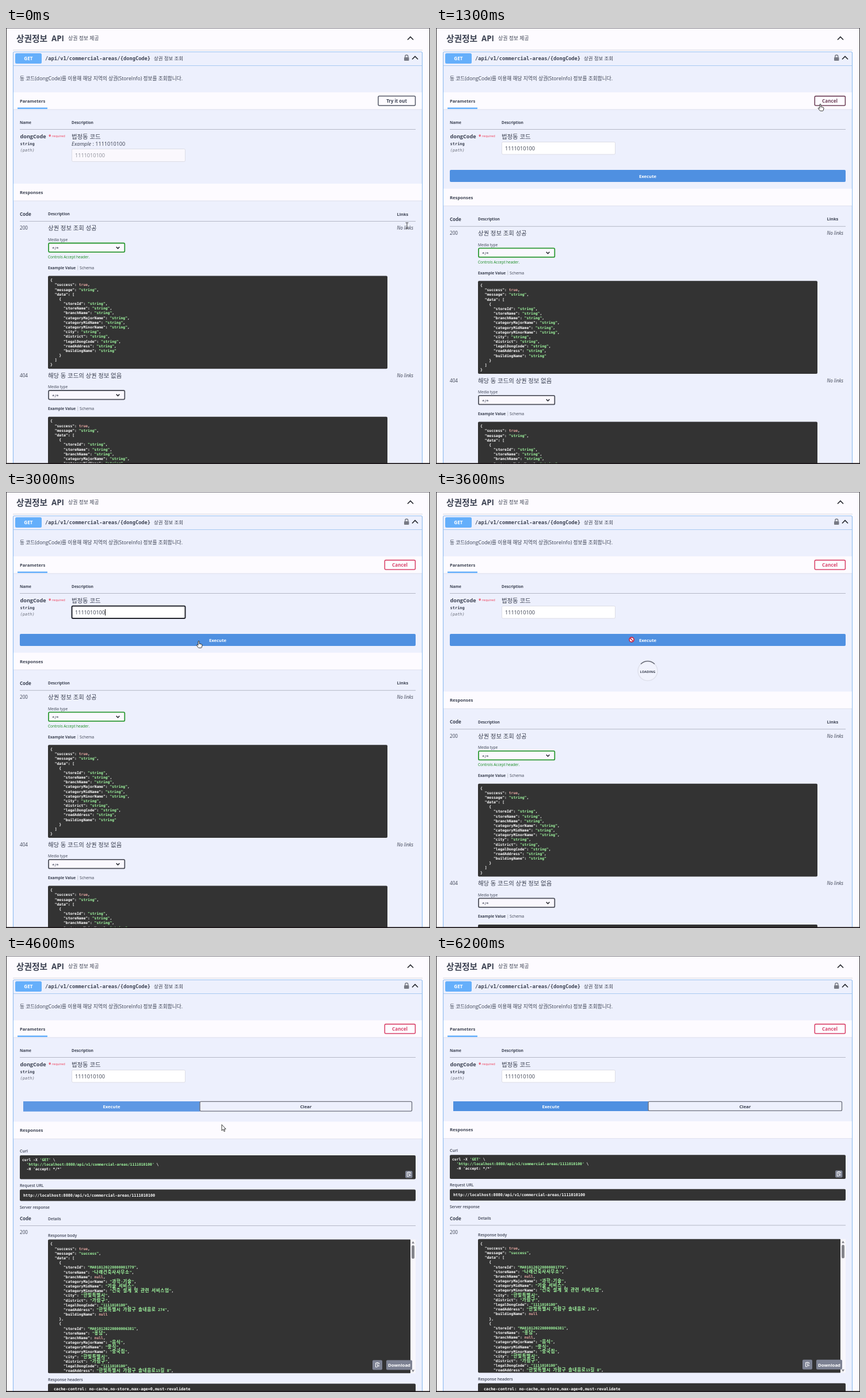
Recreate the animation shown at these times as an HTML page. Size 737 px wide and 759 px high, loop 6300 ms.

```html
<!DOCTYPE html>
<html lang="ko">
<head>
<meta charset="utf-8">
<title>API docs</title>
<style>
html, body { margin: 0; width: 737px; height: 759px; overflow: hidden; background: #fdfbff; }
svg { display: block; }
text { font-family: "Open Sans", "Noto Sans CJK KR", "Noto Sans CJK", sans-serif; fill: #3b4151; white-space: pre; }
.b { font-weight: 700; }
.m { font-weight: 600; }
.l { font-weight: 300; }
.i { font-style: italic; }
.mono { font-family: "DejaVu Sans Mono", "Noto Sans CJK KR", monospace; }
.code { fill: #fff; }
.code .str { fill: #a2fca2; }
.code .lit { fill: #e9a9a4; }
.code .ko { font-family: "Noto Sans CJK KR", "Noto Sans CJK", sans-serif; font-size: 7.65px; letter-spacing: .6px; }
</style>
</head>
<body>
<svg id="stage" width="737" height="759" viewBox="0 0 737 759"></svg>
<script>
const LOOP = 6300, STEP = 100;
const INK = '#3b4151', PAPER = '#fdfbff', PANEL = '#edf0fd', DARK = '#333', BLUE = '#4f90e1';

// Text is placed by its left edge and its vertical middle.
const text = (x, mid, str, size, cls = '', extra = '') =>
  `<text x="${x}" y="${(mid + size * .36).toFixed(2)}" font-size="${size}" class="${cls}" ${extra}>${str}</text>`;
const center = (x, mid, str, size, fill, cls = 'b') =>
  text(x, mid, str, size, cls, `text-anchor="middle" style="fill:${fill}"`);
const box = (x1, y1, x2, y2, fill, extra = '') =>
  `<rect x="${x1}" y="${y1}" width="${x2 - x1}" height="${y2 - y1}" fill="${fill}" ${extra}/>`;
const frame = (x1, y1, x2, y2, fill, stroke, w = 1.5) =>
  box(x1, y1, x2, y2, fill, `rx="2" stroke="${stroke}" stroke-width="${w}"`);
const rule = (x1, x2, y, color = '#b4b8c6') => box(x1, y, x2, y + 1, color);
const chevron = (x, y, r, dir, w = 1.5) =>
  `<path d="M${x - r} ${y - dir * r / 2}l${r} ${dir * r}l${r} ${-dir * r}" fill="none" stroke="#25272e" stroke-width="${w}"/>`;
const group = (id, body) => `<g id="${id}">${body}</g>`;

const paint = line => line
  .replace(/("[^"]*"|'[^']*')(:?)|\b(true|null)\b/g, (all, str, colon, lit) =>
    lit ? `<tspan class="lit">${lit}</tspan>` : colon ? all : `<tspan class="str">${str}</tspan>`)
  .replace(/[가-힣]+/g, run => `<tspan class="ko">${run}</tspan>`);
const code = (x, mid, lines, size = 6.36) =>
  lines.map((l, n) => text(x, mid + n * 8.17, paint(l), size, 'mono b code')).join('');

const FIELDS = ['storeId', 'storeName', 'branchName', 'categoryMajorName', 'categoryMidName', 'categoryMinorName',
  'city', 'district', 'legalDongCode', 'roadAddress', 'buildingName'];
const record = values => ['    {', ...FIELDS.map((f, n) => {
  const v = values[n];
  return `      "${f}": ${v === null ? 'null' : `"${v}"`}${n < FIELDS.length - 1 ? ',' : ''}`;
})];
const opening = msg => ['{', '  "success": true,', `  "message": "${msg}",`, '  "data": ['];
const sample = [...opening('string'), ...record(FIELDS.map(() => 'string')), '    }', '  ]', '}'];
const answer = [
  ...opening('success'),
  ...record(['MA010120220800001779', '나래건축사사무소', null, '과학·기술', '기술 서비스', '건축 설계 및 관련 서비스업',
    '한빛특별시', '가람구', '1111010100', '한빛특별시 가람구 솔내음로 274', null]),
  '    },',
  ...record(['MA010120220800006381', '홍담', null, '음식', '중식', '중국집',
    '한빛특별시', '가람구', '1111010100', '한빛특별시 가람구 솔내음로15길 8', null]).slice(0, 11)
];

const section = (top, label) =>
  box(13, top, 723, top + 29.5, PAPER) + rule(13, 723, top + 29.5, '#dfe2ee') + text(24, top + 15, label, 7.7, 'b');

const head = () =>
  box(0, 0, 737, 759, PAPER) +
  text(18, 18.5, '상권정보', 14.7, 'b') + text(79, 18.5, 'API', 13.3, 'b') +
  text(108, 18, '상권 정보 제공', 8.9) + chevron(703, 18, 5, -1, 1.6) + rule(12, 724, 38, '#d5d6df') +
  frame(12.5, 41.5, 723.5, 790, PANEL, '#93bff0', 1.2) + rule(13, 723, 65, '#a9cbf2') +
  box(16, 44, 62, 62, '#65affb', 'rx="2.5"') + center(39, 53.5, 'GET', 8.2, '#fff') +
  text(68, 53, '/api/v1/commercial-areas/{dongCode}', 8.7, 'mono b') + text(257, 53, '상권 정보 조회', 8.45) +
  box(692, 51, 700.5, 57, '#777a84', 'rx="1"') +
  '<path d="M693.8 51v-1.5a2.5 2.5 0 0 1 5 0v1.5" fill="none" stroke="#777a84" stroke-width="1.4"/>' +
  chevron(711, 52, 5, -1, 1.6) +
  text(24, 88, '동 코드(dongCode)를 이용해 해당 지역의 상권(StoreInfo) 정보를 조회합니다.', 8.7) +
  box(13, 112, 723, 141.5, PAPER) + rule(13, 723, 141.5, '#dfe2ee') +
  text(24, 127.5, 'Parameters', 7.6, 'b') + box(20, 138.5, 72, 141, '#65affb') +
  text(24, 165, 'Name', 6.7, 'b') + text(114, 165, 'Description', 6.6, 'b') + rule(24, 712, 176) +
  text(24.5, 189, 'dongCode', 9.1, 'b') + text(74, 189, '*', 8, 'b', 'style="fill:#f0405a"') +
  text(80, 187.5, 'required', 5.7, '', 'style="fill:#f0405a"') +
  text(24.5, 201.5, 'string', 7, 'mono b') + text(24.5, 212.5, '(path)', 7, 'mono i', 'style="fill:#6b6f7b"') +
  text(114, 189, '법정동 코드', 10.4, 'l');

const idle = () =>
  frame(647, 118.6, 711.5, 135, PAPER, '#555967') + center(679, 127.5, 'Try it out', 7.9, INK) +
  text(114, 201.5, '<tspan class="i">Example</tspan> : 1111010100', 9.1) +
  frame(114.5, 210.5, 311.5, 232.5, '#faf8fd', '#dcdde6', 1) +
  text(120, 222, '1111010100', 9.1, '', 'style="fill:#8d8f99"');

const editing = () =>
  frame(658.3, 118.6, 711.4, 135, PAPER, INK, 1.6).replace('<rect', '<rect id="cancelBox"') +
  center(684.5, 127.5, 'Cancel', 8.1, INK).replace('<text', '<text id="cancelText"') +
  frame(114.5, 198.5, 311.5, 220, '#fff', '#dcdde6', 1).replace('<rect', '<rect id="field"') +
  text(120, 209.5, '1111010100', 9.1) + group('caret', box(172, 204, 173, 215, '#111'));

const execute = () =>
  box(24, 247, 712, 268, BLUE, 'rx="2"') + center(368, 258, 'Execute', 7.7, '#fff');

const loading = () => {
  const r = 17, d = r * Math.SQRT1_2;
  return `<g transform="translate(368 311.5)"><circle r="${r}" fill="#f1f3fd" stroke="#dfe1ec" stroke-width="1.5"/>` +
    `<path id="arc" d="M${-d} ${-d}A${r} ${r} 0 0 1 ${d} ${-d}" fill="none" stroke="#686b76" stroke-width="1.6"/></g>` +
    center(368, 312.5, 'LOADING', 5.8, INK);
};

const reply = (y, status, title, edge) =>
  text(24, y, status, 8.1) + text(73, y, title, 10.4, 'l') + text(679.5, y, 'No links', 8.1, 'i') +
  text(73, y + 20, 'Media type', 6.6) + frame(74, y + 26, 206.3, y + 41.6, '#faf8fe', edge, 1.8) +
  text(80, y + 35, '*/*', 8) + chevron(194.5, y + 34, 2.8, 1);
const example = (y, height) =>
  text(73, y, 'Example Value', 6.6, 'b') + box(124.5, y - 4, 125.2, y + 4, '#aeb1bd') + text(128, y, 'Schema', 6.8) +
  box(73, y + 14, 663, y + 14 + height, DARK, 'rx="2"') + code(77, y + 21.5, sample);

const docs = () =>
  section(271, 'Responses') +
  text(24, 324, 'Code', 8, 'b') + text(73, 324, 'Description', 6.6, 'b') + text(679.5, 324, 'Links', 7.5, 'b') +
  rule(24, 712, 336) + reply(348.5, '200', '상권 정보 조회 성공', '#2f9a35') +
  text(73, 398.7, 'Controls Accept header.', 6.5, '', 'style="fill:#14891c"') + example(417.5, 161.7) +
  reply(605, '404', '해당 동 코드의 상권 정보 없음', '#50535d') + example(662.7, 161.7);

const copyIcon = (x, y, s) =>
  box(x, y, x + s, y + s, '#7d8293', 'rx="2"') +
  `<path transform="translate(${x + s / 2} ${y + s / 2})" d="M3 -1v-2.5h-6v7h3M-1.3 -4h2.6M-1.5 -1h3M4 1.5h-4m1.5 -1.5l-1.5 1.5l1.5 1.5" fill="none" stroke="#fff"/>`;

const results = () =>
  section(288.4, 'Responses') +
  text(24, 339.5, 'Curl', 7, 'm') + box(24, 347, 712, 388.6, DARK, 'rx="2"') +
  code(28, 354.5, ["curl -X 'GET' \\", "  'http://localhost:8080/api/v1/commercial-areas/1111010100' \\"]) +
  text(28, 370.9, "  -H 'accept: */*'", 6.36, 'mono b code') + copyIcon(694, 374, 12.5) +
  text(24, 399.5, 'Request URL', 6.8, 'm') + box(24, 406.5, 712, 426.5, DARK, 'rx="2"') +
  code(30, 416.3, ['http://localhost:8080/api/v1/commercial-areas/1111010100'], 6.8) +
  text(24, 437.5, 'Server response', 6.7, 'm') +
  text(24, 457.5, 'Code', 8, 'b') + text(73, 457.5, 'Details', 6.8, 'm') + rule(24, 712, 469) +
  text(24, 481.5, '200', 8.1) + text(73, 486.5, 'Response body', 6.9, 'm') +
  box(73, 493.5, 704, 726.3, DARK, 'rx="2"') + box(703, 493.5, 712, 726.3, '#f8f7fc') +
  box(705, 503.5, 710, 527, '#85868c', 'rx="2.5"') +
  '<path d="M705 500.5l2.5 -4l2.5 4zM705 720.5l2.5 4l2.5 -4z" fill="#85868c"/>' +
  code(77, 501.2, answer) + copyIcon(637, 703.5, 17) +
  box(661, 703.5, 706, 720.5, '#7d8293', 'rx="2"') + center(683.5, 712.5, 'Download', 7.8, '#fff') +
  text(73, 737.5, 'Response headers', 6.9, 'm') + box(73, 744.5, 712, 770, DARK, 'rx="2"') +
  code(83, 754, ['cache-control: no-cache,no-store,max-age=0,must-revalidate'], 6.8);

const pair = () =>
  box(30, 253, 369, 270, BLUE, 'id="runBox"') + center(199, 262, 'Execute', 7.7, '#fff').replace('<text', '<text id="runText"') +
  frame(369, 253.4, 705.5, 269.4, PANEL, '#70737f', 1.4).replace('<rect', '<rect id="clearBox"') +
  center(537, 262, 'Clear', 7.8, INK).replace('<text', '<text id="clearText"');

const outlined = d => `<path d="${d}" fill="#fff" stroke="#222" stroke-width=".9" stroke-linejoin="round"/>`;
const pointers = {
  arrow: outlined('M0 0v10.5l2.4 -2.2l1.7 3.7l1.6 -.7l-1.7 -3.6h3.2z'),
  hand: outlined('M-1 1q1 -1.6 2 0v4.2l4 .9q1.2 .4 1 2l-.8 3.4q-.3 .8 -1 .8h-4q-.8 0 -1.3 -.9l-2.7 -3.7q.4 -1.6 2 -.4l.8 .7z'),
  beam: '<path d="M-2.5 -5h5M0 -5v10M-2.5 5h5" fill="none" stroke="#444" stroke-width="1"/>',
  block: '<circle r="4" fill="#fff" stroke="#c8324e" stroke-width="1.8"/><path d="M-2.8 -2.8l5.6 5.6" stroke="#c8324e" stroke-width="1.8"/>'
};

// time, x, y, pointer shape
const track = [
  [0, 697, 344, 'beam'], [200, 696, 336, 'arrow'], [1000, 668, 133, 'hand'], [1300, 668, 132, 'hand'],
  [1500, 650, 135, 'arrow'], [2100, 232, 210, 'beam'], [2600, 232, 210, 'beam'], [2800, 285, 232, 'arrow'],
  [3000, 335, 259, 'hand'], [3500, 340, 257, 'hand'], [3600, 340, 257, 'block'], [3800, 340, 257, 'arrow'],
  [4100, 361, 286, 'arrow'], [4300, 361, 286, 'arrow'], [4600, 375, 293.5, 'arrow'], [4800, 376, 294, 'arrow'],
  [5300, 705, 24, 'arrow'], [5400, 725, -30, ''], [5600, 725, -7, 'arrow'], [5700, 725, -30, ''], [LOOP, 725, -30, '']
];

document.getElementById('stage').innerHTML =
  head() + group('idle', idle()) + group('editing', editing()) + group('execute', execute()) +
  group('loading', loading()) + group('docs', docs()) + group('pair', pair()) + group('results', results()) +
  box(0, 0, 737, 1, '#85838a') + box(0, 0, 1, 759, '#2b2a2e') + box(736, 0, 737, 759, '#2b2a2e') + box(0, 757.3, 737, 759, '#1c1619') +
  group('pointer', Object.entries(pointers).map(([name, art]) => group(name, art)).join(''));

const $ = id => document.getElementById(id);
const show = (id, on) => { $(id).style.display = on ? '' : 'none'; };
const set = (id, attrs) => Object.entries(attrs).forEach(([k, v]) => $(id).setAttribute(k, v));
const ramp = (t, from, to) => Math.min(1, Math.max(0, (t - from) / (to - from)));
const mix = (a, b, p) => a + (b - a) * p;

function movePointer(t) {
  const n = track.findIndex(k => k[0] > t) - 1;
  const [t0, x0, y0, shape] = track[n], [t1, x1, y1] = track[n + 1];
  const p = ramp(t, t0, t1), e = p * p * (3 - 2 * p);
  set('pointer', { transform: `translate(${mix(x0, x1, e)} ${mix(y0, y1, e)})` });
  Object.keys(pointers).forEach(name => show(name, name === shape));
}

function render(t) {
  const open = t >= 1200, busy = t >= 3600 && t < 4500, done = t >= 4500;
  const focused = t >= 2200 && t < 3500;
  show('idle', !open);
  show('editing', open);
  show('execute', open && !done);
  show('loading', busy);
  show('docs', !done);
  show('pair', done);
  show('results', done);

  const p = ramp(t, 1200, 1500);
  const tint = `rgb(${mix(59, 217, p)},${mix(65, 70, p)},${mix(81, 108, p)})`;
  set('cancelBox', { stroke: tint });
  $('cancelText').style.fill = tint;
  set('field', { stroke: focused ? '#22242c' : '#dcdde6', 'stroke-width': focused ? 2 : 1 });
  show('caret', focused);
  set('execute', { opacity: mix(1, .32, ramp(t, 3600, 3900)) });
  set('arc', { transform: `rotate(${(t - 3600) * .36})` });
  set('docs', { transform: `translate(0 ${busy ? 76.3 : open ? 8.8 : 0})` });

  const q = ramp(t, 4400, 4800), split = mix(305, 369, q), drop = q < 1 ? .7 : 0;
  set('runBox', { width: split - 30, height: 17 + drop, opacity: mix(.8, 1, q) });
  set('runText', { x: (30 + split) / 2 });
  set('clearBox', { x: split, width: 705.5 - split, height: 16 + drop });
  set('clearText', { x: (split + 705.5) / 2 });
  set('results', { transform: `translate(0 ${drop - .7})` });
  movePointer(t);
}

const start = performance.now();
function tick() {
  const t = (performance.now() - start) % LOOP;
  render(Math.floor(t / STEP) * STEP);
  requestAnimationFrame(tick);
}
tick();
</script>
</body>
</html>
```
